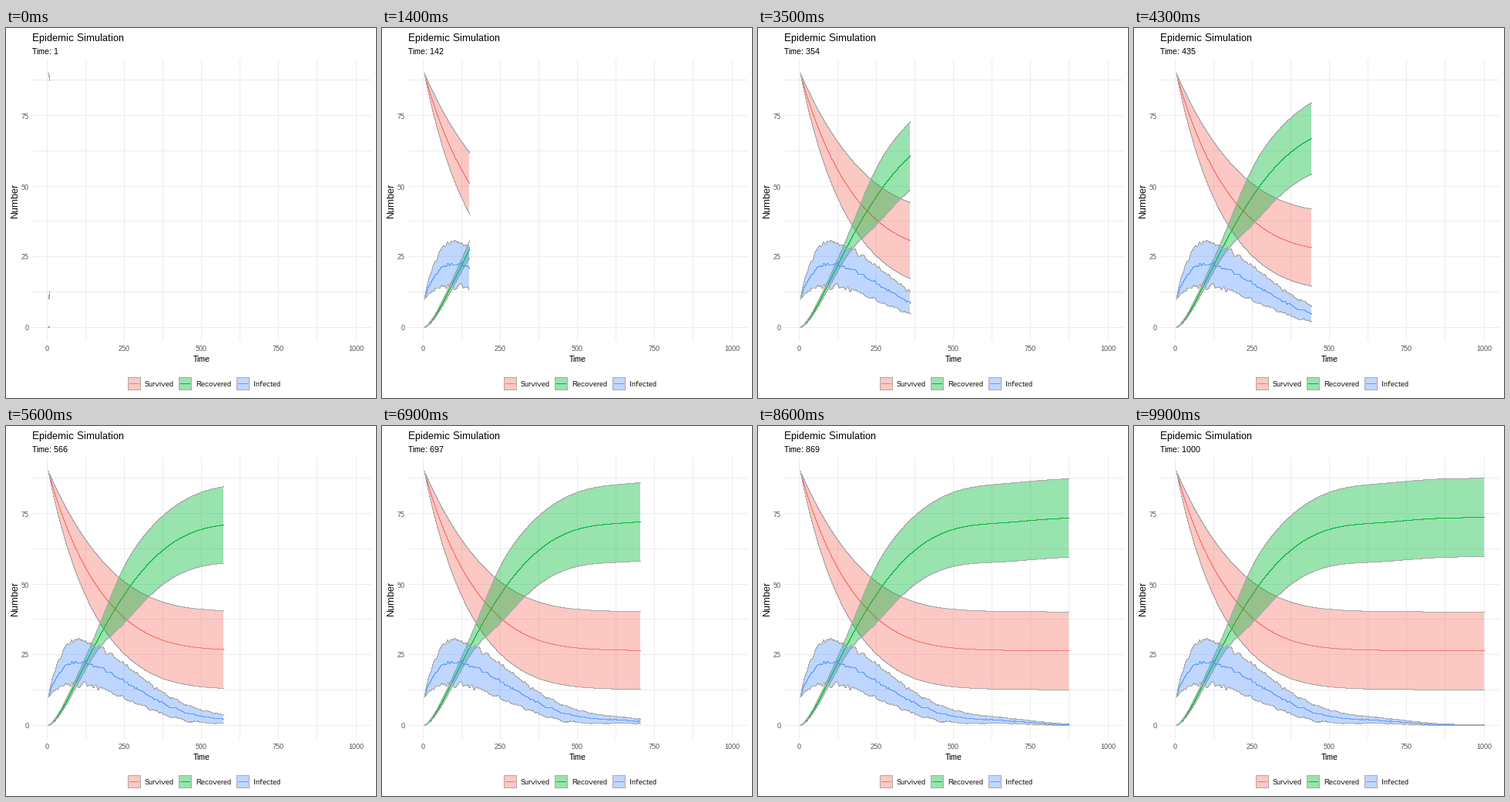
These frames come from a looping animation (480x480 px, 10 s). A matplotlib script:

```python
import numpy as np
import matplotlib.pyplot as plt
from matplotlib.animation import FuncAnimation
from matplotlib.patches import Polygon, Rectangle

plt.rcParams.update({
    "font.family": "Liberation Sans",
    "text.hinting": "native",
    "text.hinting_factor": 1,
})

SIZE, DPI, FRAMES = 480, 96, 100
PX = 72 / DPI
EDGE, GRID, TICK = "#A9A9A9", "#EBEBEB", "#4D4D4D"
LEFT, RIGHT, TOP, BOTTOM = 34, 474, 41, 406
X0, X_STEP, Y0, Y_STEP = 53.6, 0.4004, 388.3, 3.662
CRISP = dict(antialiased=False, snap=False)


def sx(t):
    return X0 + X_STEP * t


def row(v):
    """Centre of the pixel row that holds value v."""
    return np.floor(Y0 - Y_STEP * v) + 0.5


# One sample of the epidemic per pixel column
cols = np.arange(54, 455)
t = (cols - cols[0]) / X_STEP
rng = np.random.default_rng(4)


def wobble(scale):
    steps = np.repeat(rng.normal(0, 1, len(cols) // 2 + 1), 2)[:len(cols)]
    return scale * np.convolve(steps, np.ones(3) / 3, "same")


rise = 1 - np.exp(-t / 45)
surv = (26.4 + 63 * np.exp(-0.0063 * t - 1.25e-8 * t**3)
        + 0.6 * np.exp(-(t / 600)**4))
surv_sd = 13.8 * (1 - np.exp(-t / 95))
inf = ((10 + 16 * rise) * np.exp(-(t / 340)**2.1)
       + 1.2 * np.exp(-((t - 660) / 150)**2))
inf_sd = 9.8 * rise * np.exp(-(t / 380)**1.5)
rec = 100 - surv - inf
rec_sd = (9 / (1 + np.exp((200 - t) / 28)) + 2.5 * np.tanh(t / 150)
          + 2.4 * (1 - np.exp(-(t / 480)**4)))
inf = inf + wobble(0.07 * inf_sd)
inf_sd = inf_sd + wobble(0.07 * inf_sd)

GROUPS = [
    ("Survived", "#F8766D", 158, surv, surv_sd),
    ("Recovered", "#00BA38", 224, rec, rec_sd),
    ("Infected", "#619CFF", 299, inf, inf_sd),
]

fig = plt.figure(figsize=(SIZE / DPI, SIZE / DPI), dpi=DPI, facecolor="white")
ax = fig.add_axes([0, 0, 1, 1])
ax.set(xlim=(0, SIZE), ylim=(SIZE, 0))
ax.axis("off")


def line(x, y, color, z):
    # Half a pixel wide and centred, so it fills exactly one pixel
    return ax.plot(x, y, color=color, lw=0.5 * PX, zorder=z,
                   drawstyle="steps-post", solid_capstyle="butt", **CRISP)[0]


def label(x, y, s, px, color="black", **kw):
    return ax.text(x, y, s, fontsize=px * PX, color=color, **kw)


# Grid and axis labels
for v in range(0, 1001, 125):
    x = int(sx(v)) + 0.5
    line([x, x], [TOP, BOTTOM], GRID, 1)
    if v % 250 == 0:
        label(x, 419, str(v), 9, TICK, ha="center")
for v in np.arange(0, 88, 12.5):
    y = row(v)
    line([LEFT, RIGHT], [y, y], GRID, 1)
    if v % 25 == 0:
        label(30, y + 4, f"{v:.0f}", 9, TICK, ha="right")

label(34, 17, "Epidemic Simulation", 13)
clock = label(34, 34, "", 11)
label(254, 433, "Time", 11, ha="center")
label(11.5, 223.5, "Number", 12, rotation=90, ha="center", va="center")

# Bands, mean lines and legend keys
layers = []
for z, (name, color, kx, mean, sd) in enumerate(GROUPS, 3):
    fill = dict(facecolor=color, edgecolor="none", alpha=0.4, lw=0, **CRISP)
    band = ax.add_patch(Polygon(np.zeros((3, 2)), zorder=z, **fill))
    hi, lo = row(mean + sd), row(mean - sd)
    strokes = [(line([], [], color, 2), row(mean)),
               (line([], [], EDGE, z + 0.1), hi),
               (line([], [], EDGE, z + 0.1), lo)]
    layers.append((band, hi, lo, strokes))

    line([kx + 2, kx + 15], [461.5, 461.5], color, 2)
    ax.add_patch(Rectangle((kx, 453), 17, 17, zorder=3, **fill))
    l, r, u, d = kx + 0.5, kx + 16.5, 453.5, 469.5
    line([l, r, r, l, l], [u, u, d, d, u], EDGE, 4)
    label(kx + 22, 465, name, 9)


def update(i):
    now = 1 + 999 * i / (FRAMES - 1)
    clock.set_text(f"Time: {now:.0f}")
    n = min(len(cols), int(sx(now) + 2.45) - cols[0] + 1)
    x = np.repeat(cols[:n], 2)[1:-1]
    for band, hi, lo, strokes in layers:
        top, low = (np.repeat(e[:n - 1], 2) for e in (hi, lo))
        band.set_xy(np.column_stack([np.r_[x, x[::-1]],
                                     np.r_[top, low[::-1]]]))
        for stroke, y in strokes:
            stroke.set_data(cols[:n] + 0.5, y[:n])
    return []


anim = FuncAnimation(fig, update, frames=FRAMES, interval=100,
                     repeat=True, repeat_delay=0, blit=False)
plt.show()
```
